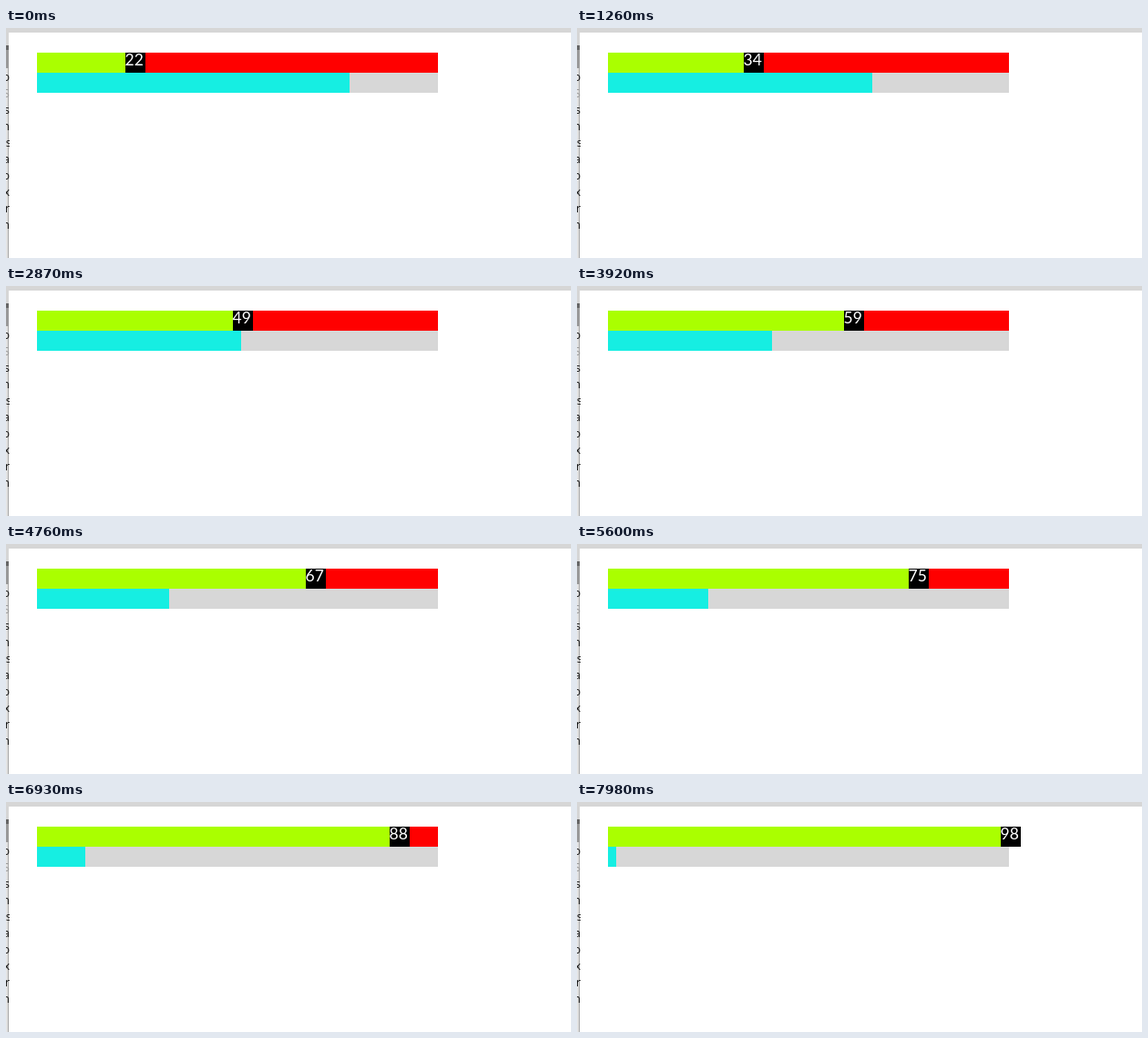
An HTML page with a canvas for the animation above (8 s loop, 620 by 252 pixels).

```html
<!DOCTYPE html>
<html lang="en">
<head>
<meta charset="utf-8">
<title>Progress bars</title>
<style>
  html, body { margin: 0; width: 100%; height: 100%; overflow: hidden; background: #fff; }
  canvas { display: block; }
</style>
</head>
<body>
<canvas id="stage" width="620" height="252"></canvas>
<script>
const ctx = document.getElementById('stage').getContext('2d');
const LOOP = 8000;
const LEFT = 34, TOP = 27, WIDTH = 440, ROW = 22;

function rect(color, x, y, w, h) {
  ctx.fillStyle = color;
  ctx.fillRect(x, y, w, h);
}

// The counter ticks twice per 210 ms: after 140 ms, then after 70 ms.
function percentAt(t) {
  return 22 + 2 * Math.floor(t / 210) + (t % 210 >= 140 ? 1 : 0);
}

const barWidth = percent => Math.floor(WIDTH * percent / 100 + 0.3);

// Sliver of the window lying behind the page.
function drawEdge() {
  rect('#d6d6d6', 0, 0, 620, 5);
  rect('#d6d6d6', 0, 5, 3, 247);
  rect('#666', 0, 19, 3, 5);
  rect('#999', 0, 24, 3, 20);
  rect('#e2e2e2', 0, 44, 2, 208);
  rect('#a6a6a6', 2, 44, 1, 208);

  ctx.save();
  ctx.beginPath();
  ctx.rect(0, 44, 4, 208);
  ctx.clip();
  ctx.font = '13px "Open Sans", sans-serif';
  ctx.textAlign = 'right';
  [...'oSshsaoxrh'].forEach((letter, i) => {
    ctx.fillStyle = i === 1 ? '#999' : '#111';
    ctx.fillText(letter, i === 4 ? 6 : 4, 58 + 18 * i);
  });
  ctx.restore();
}

function drawBars(percent) {
  const done = barWidth(percent);
  const x = LEFT + done;
  rect('#f00', LEFT, TOP, WIDTH, ROW);
  rect('#af0', LEFT, TOP, done, ROW);
  rect('#000', x, TOP, 22, ROW);

  ctx.fillStyle = '#fff';
  ctx.font = '17.5px Lato, sans-serif';
  ctx.textAlign = 'left';
  ctx.fillText(percent, x - 0.5, 41);

  rect('#d7d7d7', LEFT, TOP + ROW, WIDTH, ROW);
  rect('#16eee2', LEFT, TOP + ROW, barWidth(100 - percent), ROW);
}

function draw() {
  rect('#fff', 0, 0, 620, 252);
  drawEdge();
  drawBars(percentAt(performance.now() % LOOP));
  requestAnimationFrame(draw);
}

draw();
</script>
</body>
</html>
```
